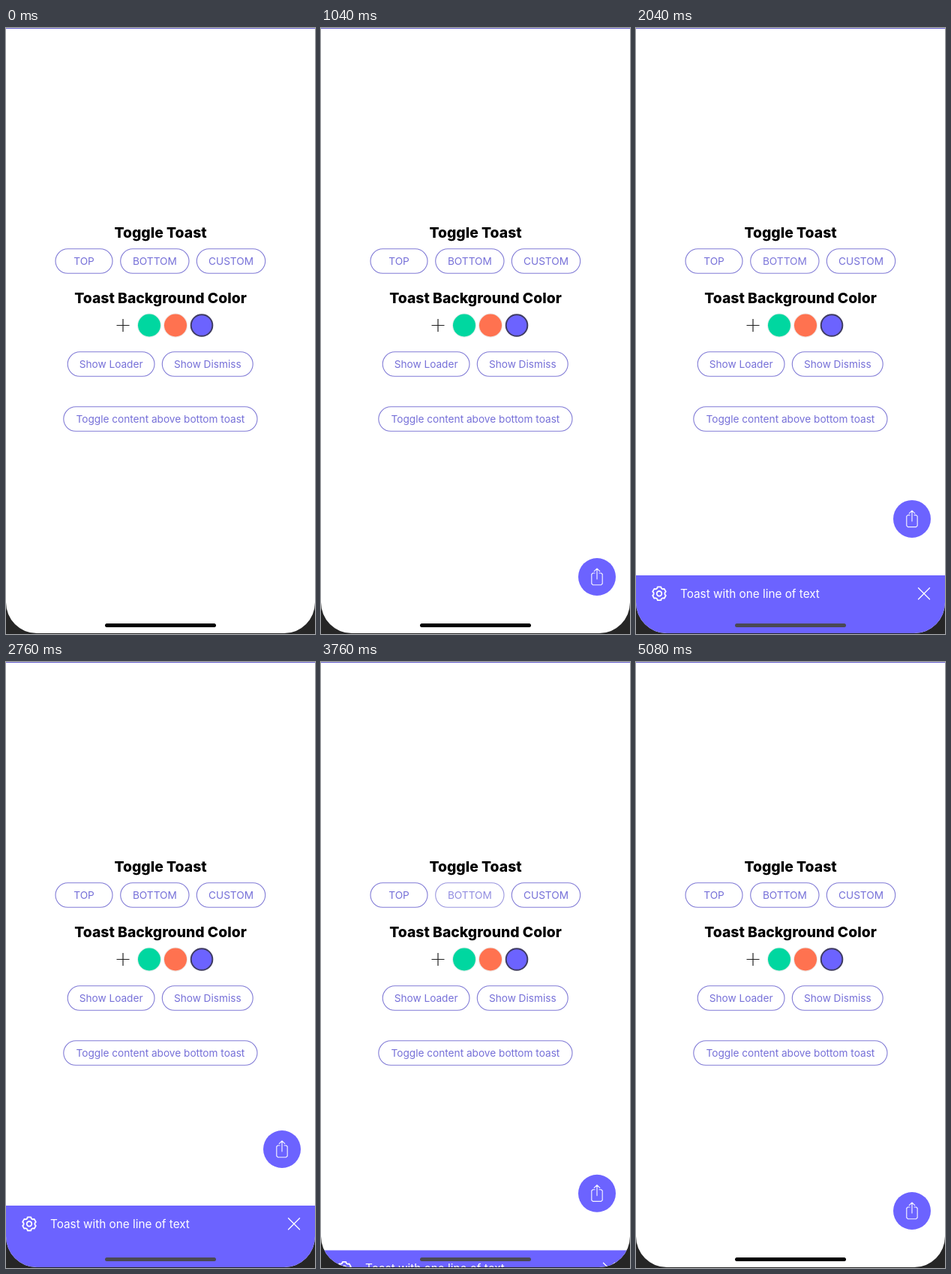
Animation, 412 px wide and 806 px high, one loop 5.12 s. Source, as an HTML page with a canvas:

```html
<!DOCTYPE html>
<html lang="en">
<head>
<meta charset="utf-8">
<title>Toast demo</title>
<style>
  html, body { margin: 0; width: 100%; height: 100%; overflow: hidden; background: #fff; }
  canvas { display: block; width: 412px; height: 806px; }
</style>
</head>
<body>
<canvas id="stage"></canvas>
<script>
const W = 412, H = 806, LOOP = 5120;
const VIOLET = '#6c63ff', LABEL = '#7670d8', OUTLINE = '#817bd6', RING = '#3f3c62';
const TOAST_HEIGHT = 83;
const FAB_TAP = 676, OPEN_TAP = 1793, CLOSE_TAP = 3574;

const canvas = document.getElementById('stage');
const ctx = canvas.getContext('2d');
const dpr = window.devicePixelRatio || 1;
canvas.width = W * dpr;
canvas.height = H * dpr;

const clamp = x => Math.min(1, Math.max(0, x));
const inOutQuad = x => x < 0.5 ? 2 * x * x : 1 - 2 * (1 - x) * (1 - x);
const ease = (t, start, length) => inOutQuad(clamp((t - start) / length));

// Opacity of a tapped button: quick dim, then slow recovery.
function tapOpacity(t, tap) {
  const dim = ease(t, tap - 73, 110) - ease(t, tap + 50, 250);
  return 1 - 0.5 * dim;
}

function text(str, x, y, size, weight, color, align = 'center') {
  ctx.font = `${weight} ${size}px Inter, Roboto, sans-serif`;
  ctx.textAlign = align;
  ctx.textBaseline = 'alphabetic';
  ctx.fillStyle = color;
  ctx.fillText(str, x, y);
}

function lines(color, width, ...paths) {
  ctx.strokeStyle = color;
  ctx.lineWidth = width;
  ctx.beginPath();
  for (const [start, ...rest] of paths) {
    ctx.moveTo(...start);
    rest.forEach(p => ctx.lineTo(...p));
  }
  ctx.stroke();
}

function disc(x, y, r, color) {
  ctx.fillStyle = color;
  ctx.beginPath();
  ctx.arc(x, y, r, 0, Math.PI * 2);
  ctx.fill();
}

function button(label, left, right, top, opacity = 1) {
  ctx.globalAlpha = opacity;
  ctx.strokeStyle = OUTLINE;
  ctx.lineWidth = 1.1;
  ctx.beginPath();
  ctx.roundRect(left, top, right - left, 32.5, 16.25);
  ctx.stroke();
  text(label, (left + right) / 2, top + 21.3, 13.65, 400, LABEL);
  ctx.globalAlpha = 1;
}

function swatch(x, color, ring, outer, inner) {
  disc(x, 395.5, outer, ring);
  disc(x, 395.5, inner, color);
}

function shareButton(y) {
  ctx.save();
  ctx.translate(368, y);
  disc(0, 0, 25, VIOLET);
  ctx.lineCap = ctx.lineJoin = 'round';
  lines('#f4f3ff', 1.15,
    [[0, 3], [0, -11]],
    [[-3.8, -7.3], [0, -11], [3.8, -7.3]],
    [[-3, -5], [-5.5, -5], [-7.2, -3.5], [-7.2, 9], [-5.5, 10.7],
     [5.5, 10.7], [7.2, 9], [7.2, -3.5], [5.5, -5], [3, -5]]);
  ctx.restore();
}

function gear(x, y) {
  ctx.save();
  ctx.translate(x, y);
  ctx.strokeStyle = '#fff';
  ctx.lineWidth = 1.8;
  ctx.lineJoin = 'round';
  ctx.beginPath();
  for (let i = 0; i < 6; i++) {
    for (const [r, deg] of [[7.5, -22], [9.2, -14], [9.2, 14], [7.5, 22]]) {
      const a = (i * 60 - 90 + deg) * Math.PI / 180;
      ctx.lineTo(r * Math.cos(a), r * Math.sin(a));
    }
  }
  ctx.closePath();
  ctx.stroke();
  ctx.beginPath();
  ctx.arc(0, 0, 3.3, 0, Math.PI * 2);
  ctx.stroke();
  ctx.restore();
}

function toast(top) {
  ctx.fillStyle = VIOLET;
  ctx.fillRect(0, top, W, H - top);
  const y = top + 24.3;
  gear(31, y);
  text('Toast with one line of text', 59, top + 29.8, 15.3, 400, '#fff', 'left');
  ctx.lineCap = 'round';
  lines('#fff', 1.3,
    [[376.5, y - 7.5], [391.5, y + 7.5]],
    [[391.5, y - 7.5], [376.5, y + 7.5]]);
}

function homeBar(t) {
  const k = ease(t, 1780, 100) - ease(t, 3960, 300);
  ctx.fillStyle = `rgb(${74 * k}, ${73 * k}, ${84 * k})`;
  ctx.beginPath();
  ctx.roundRect(132, 792, 148, 5, 2.5);
  ctx.fill();
}

function draw(t) {
  const shown = ease(t, OPEN_TAP, 300) - ease(t, CLOSE_TAP, 300);
  const lift = TOAST_HEIGHT * shown;

  ctx.setTransform(dpr, 0, 0, dpr, 0, 0);
  ctx.fillStyle = '#262626';
  ctx.fillRect(0, 0, W, H);
  ctx.save();
  ctx.beginPath();
  ctx.roundRect(0, 0, W, 805, [0, 0, 41, 41]);
  ctx.clip();
  ctx.fillStyle = '#fff';
  ctx.fillRect(0, 0, W, H);
  ctx.fillStyle = '#6962cf';
  ctx.fillRect(0, 0, W, 1);

  text('Toggle Toast', 206, 279, 19.35, 800, '#000');
  text('Toast Background Color', 206, 366, 19.35, 800, '#000');

  const bottomOpacity = Math.min(tapOpacity(t, OPEN_TAP), tapOpacity(t, CLOSE_TAP));
  button('TOP', 66, 142, 293.8);
  button('BOTTOM', 152.7, 244, 293.8, bottomOpacity);
  button('CUSTOM', 254.3, 345.7, 293.8);
  button('Show Loader', 82.2, 198, 430.8);
  button('Show Dismiss', 208.3, 329.2, 430.8);
  button('Toggle content above bottom toast', 76.8, 335, 503.8, tapOpacity(t, FAB_TAP));

  ctx.lineCap = 'butt';
  lines('#222', 1.2, [[147.5, 395.5], [164.5, 395.5]], [[156, 387], [156, 404]]);
  swatch(191, '#00d7a0', '#e2eeea', 16, 15);
  swatch(226, '#ff7250', '#eee4e1', 16, 15);
  swatch(261, VIOLET, RING, 15.3, 13.3);

  if (t >= FAB_TAP) shareButton(730 - lift * 82 / TOAST_HEIGHT);
  if (shown > 0) toast(H - lift);
  homeBar(t);
  ctx.restore();
}

const begin = performance.now();
function frame() {
  draw((performance.now() - begin) % LOOP);
  requestAnimationFrame(frame);
}
frame();
</script>
</body>
</html>
```
